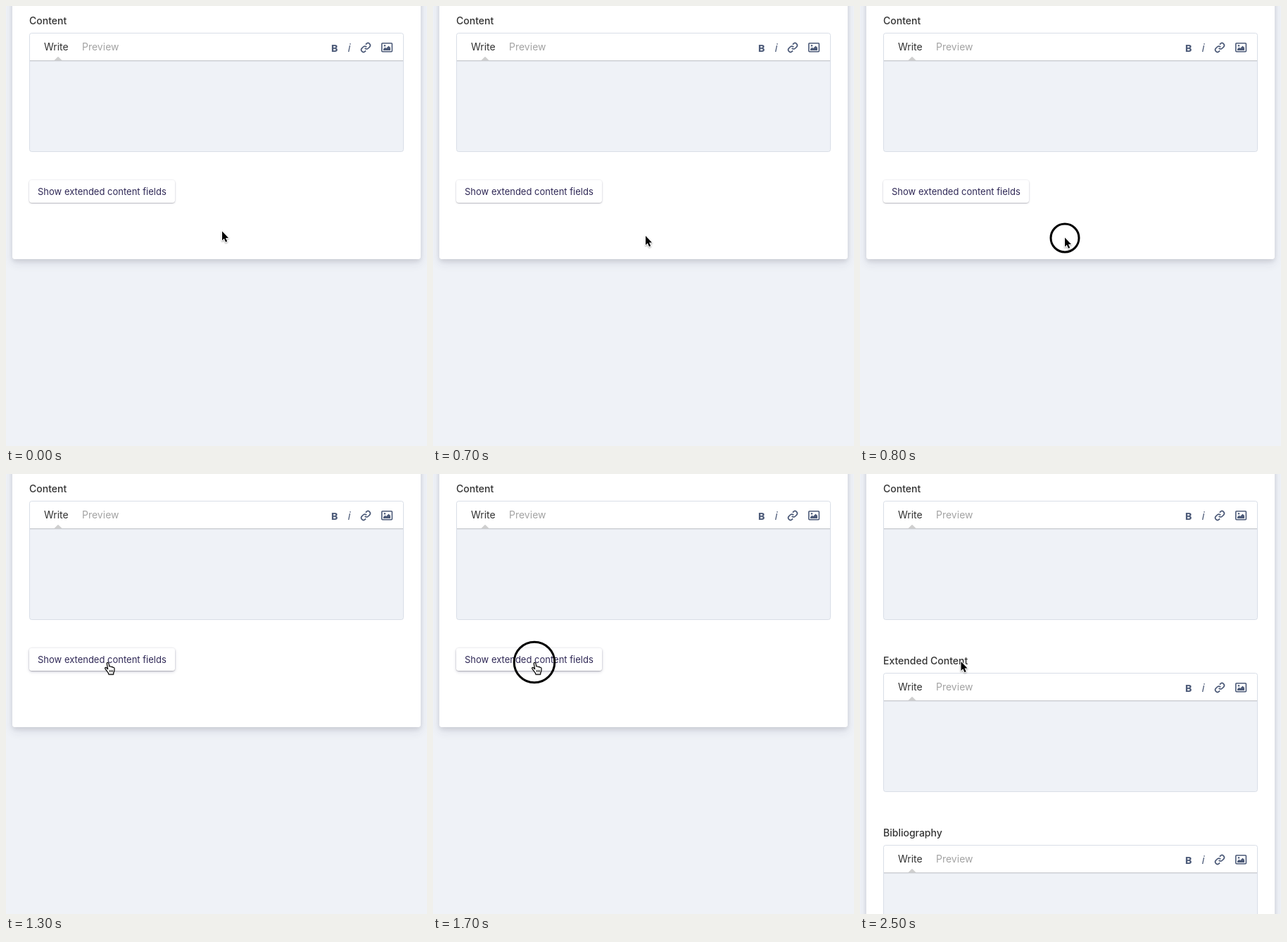
An HTML page with a canvas that plays this animation: 598 by 624 pixels, repeating every 3500 ms.

```html
<!DOCTYPE html>
<html lang="en">
<head>
<meta charset="utf-8">
<title>Extended content fields</title>
<style>
  html, body { margin: 0; width: 100%; height: 100%; overflow: hidden; background: #eff2f7; }
  canvas { display: block; width: 598px; height: 624px; }
</style>
</head>
<body>
<canvas id="stage" width="598" height="624"></canvas>
<script>
const ctx = document.getElementById('stage').getContext('2d');
const LOOP = 3500;
const EXPAND_AT = 1800;
const HOVER_AT = 1200;
const SANS = 'Inter, "Open Sans", sans-serif';
const ICON = '#4c5a78';
const PALE = '#eff2f7';

// Pointer recording: time, x, y of the tip; each position holds until the next.
const pointer = [
  [0, 307, 319.5], [400, 307, 320.5], [600, 306, 322], [700, 302, 326],
  [800, 291, 328.5], [900, 254, 318], [1000, 204, 300], [1100, 164, 281],
  [1200, 147, 270], [1300, 143.5, 266]
];

const clicks = [
  { at: 800, x: 291, y: 329, r: 20 },
  { at: 1700, x: 144, y: 267, r: 28.8 }
];

const arrow = new Path2D('M0 0V13L2.8 10.3 5 15.3 7.2 14.3 5 9.6H9Z');
const hand = new Path2D('M4.7 10 3.2 8.6Q1.5 7 .7 8.2 .3 9 2 11L5.3 15.3 5.9 17.5H12.6L12.8 15Q14 13 14 11V9Q13.6 7.2 12 7.7 11 6.2 9.5 6.9 8.4 5.6 6.9 6.3L5.9 1.8Q5.3 .3 4.1 .7 3 1.2 3.3 2.4Z');
const handLines = new Path2D('M7.4 11.2V14.4M9.4 11.2V14.4M11.4 11.2V14.4');
const link = new Path2D('M10 13a5 5 0 0 0 7.54.54l3-3a5 5 0 0 0-7.07-7.07l-1.72 1.71M14 11a5 5 0 0 0-7.54-.54l-3 3a5 5 0 0 0 7.07 7.07l1.71-1.71');
const mountains = new Path2D('M536 63V61L538.5 58.5 540 60 543.5 56.5 546 59V63Z');

function rounded(x, y, w, h, r) {
  ctx.beginPath();
  ctx.roundRect(x, y, w, h, r);
}

function shadow(color, blur, dy) {
  ctx.shadowColor = color;
  ctx.shadowBlur = blur;
  ctx.shadowOffsetY = dy;
}

function raised(x, y, w, h, r, shadows) {
  ctx.save();
  ctx.fillStyle = '#fff';
  for (const s of shadows) {
    shadow(...s);
    rounded(x, y, w, h, r);
    ctx.fill();
  }
  ctx.restore();
}

function text(str, x, y, font, color) {
  ctx.font = font;
  ctx.fillStyle = color;
  ctx.fillText(str, x, y);
}

function toolbar() {
  text('B', 461.5, 65, '700 15px "Noto Sans", sans-serif', ICON);
  text('i', 485.5, 65, 'italic 400 16px "Open Sans", sans-serif', ICON);

  ctx.save();
  ctx.strokeStyle = ICON;
  ctx.translate(511, 59);
  ctx.scale(0.64, 0.64);
  ctx.translate(-12, -12);
  ctx.lineWidth = 2.6;
  ctx.stroke(link);
  ctx.restore();

  ctx.strokeStyle = ICON;
  ctx.lineWidth = 1.6;
  rounded(533.8, 52.8, 14.6, 12, 1);
  ctx.stroke();
  ctx.fillStyle = ICON;
  ctx.fill(mountains);
  ctx.beginPath();
  ctx.arc(538, 56.2, 1.2, 0, Math.PI * 2);
  ctx.fill();
}

function editor(title, dy) {
  ctx.save();
  ctx.translate(0, dy);
  text(title, 33, 26, '500 14px ' + SANS, '#333');

  rounded(33.5, 38.5, 531, 168, 3);
  ctx.fillStyle = PALE;
  ctx.fill();
  ctx.fillStyle = '#fff';
  ctx.fillRect(34, 39, 530, 38);
  ctx.fillStyle = '#c9cbcf';
  ctx.fillRect(34, 77, 530, 1);
  ctx.fillStyle = '#e2e5ea';
  ctx.fillRect(34, 78, 530, 1);
  ctx.fillStyle = '#cfcfcf';
  ctx.fill(new Path2D('M68.5 77 74 71.8 79.5 77Z'));
  ctx.strokeStyle = '#d9dee7';
  ctx.lineWidth = 1;
  rounded(33.5, 38.5, 531, 168, 3);
  ctx.stroke();

  text('Write', 54, 63, '400 14px ' + SANS, '#333');
  text('Preview', 108, 63, '400 14px ' + SANS, '#a3a3a3');
  toolbar();
  ctx.restore();
}

function button(hovered) {
  const shadows = [
    ['rgba(50,50,93,.16)', 2, 0],
    ['rgba(50,50,93,.16)', 3, 1],
    ['rgba(0,0,0,.14)', 1, 1]
  ];
  if (hovered) shadows.push(['rgba(50,50,93,.14)', 5, 2]);
  raised(33, 247, 207, 32, 4, shadows);
  text('Show extended content fields', 45, 268, '400 13px ' + SANS, '#2f2856');
}

function drawPointer(x, y, isHand) {
  ctx.save();
  ctx.lineJoin = 'round';
  if (isHand) {
    ctx.translate(x - 3.5, y + 0.7);
    shadow('rgba(0,0,0,.3)', 2, 1);
    ctx.fillStyle = '#fff';
    ctx.fill(hand);
    shadow('transparent', 0, 0);
    ctx.strokeStyle = '#000';
    ctx.lineWidth = 1.2;
    ctx.stroke(hand);
    ctx.lineWidth = 0.9;
    ctx.stroke(handLines);
  } else {
    ctx.translate(x, y);
    shadow('rgba(0,0,0,.35)', 2, 1);
    ctx.strokeStyle = '#fff';
    ctx.lineWidth = 2;
    ctx.stroke(arrow);
    shadow('transparent', 0, 0);
    ctx.fillStyle = '#000';
    ctx.fill(arrow);
  }
  ctx.restore();
}

function draw(t) {
  const expanded = t >= EXPAND_AT;
  const hovered = t >= HOVER_AT && !expanded;

  ctx.fillStyle = PALE;
  ctx.fillRect(0, 0, 598, 624);
  raised(9, -40, 580, expanded ? 900 : 399, 4, [
    ['rgba(50,50,93,.11)', 14, 6],
    ['rgba(0,0,0,.09)', 6, 3]
  ]);

  editor('Content', 0);
  if (expanded) {
    editor('Extended Content', 244);
    editor('Bibliography', 488);
  } else {
    button(hovered);
  }

  const [, x, y] = pointer.findLast(p => p[0] <= t);
  drawPointer(x, y, hovered);

  const click = clicks.find(c => t >= c.at && t < c.at + 100);
  if (click) {
    ctx.strokeStyle = '#000';
    ctx.lineWidth = 3;
    ctx.beginPath();
    ctx.arc(click.x, click.y, click.r, 0, Math.PI * 2);
    ctx.stroke();
  }
}

const start = performance.now();
function tick() {
  draw((performance.now() - start) % LOOP);
  requestAnimationFrame(tick);
}
tick();
</script>
</body>
</html>
```
